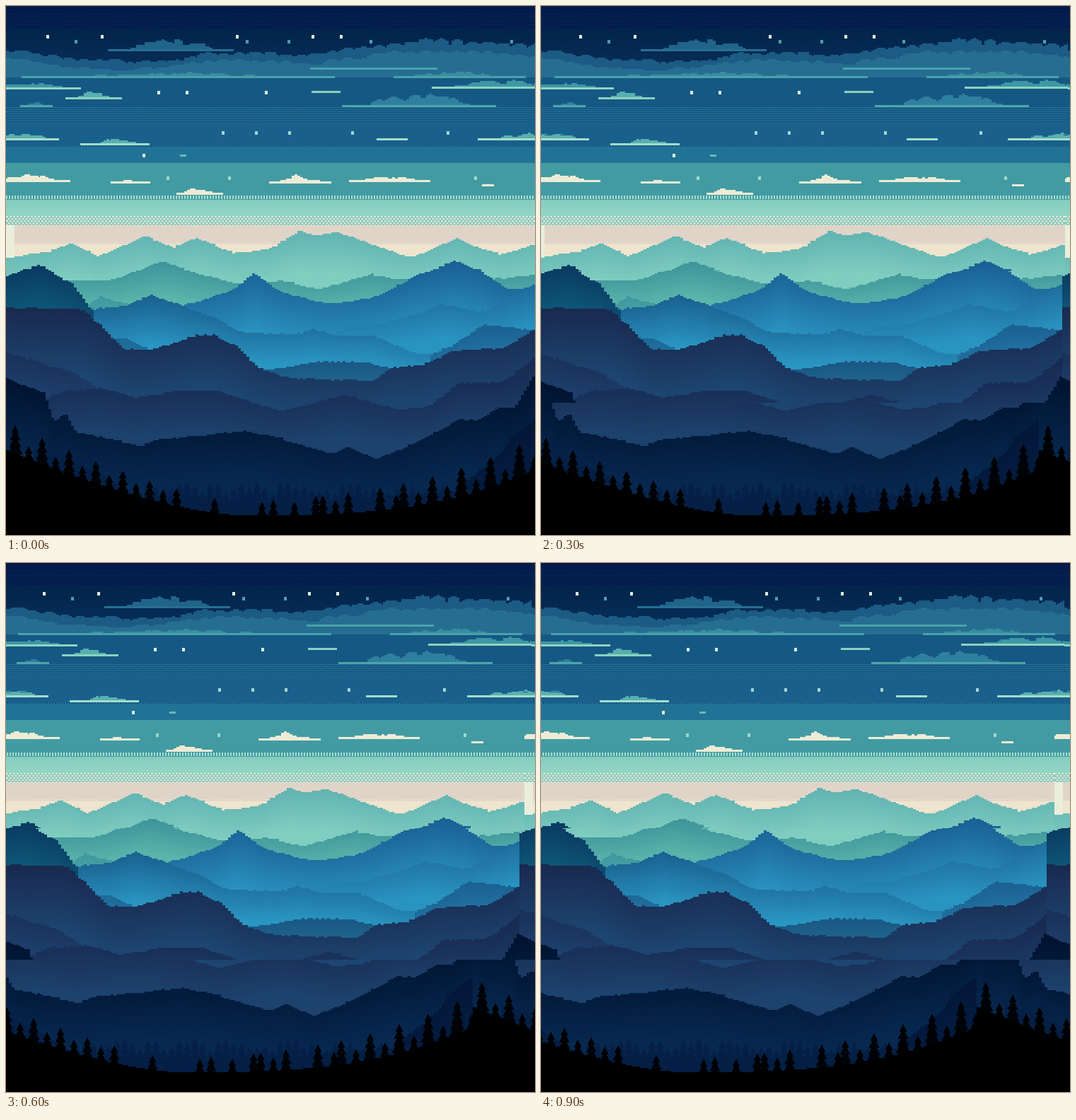
An HTML page with a canvas that plays this animation: 748 px wide and 748 px high, repeating every 1000 ms.

```html
<!DOCTYPE html>
<html lang="en">
<head>
<meta charset="utf-8">
<title>Pixel mountains</title>
<style>
html, body { margin: 0; height: 100%; overflow: hidden; background: #000; }
canvas { display: block; width: 100vw; height: 100vh; }
</style>
</head>
<body>
<canvas id="stage" width="748" height="748"></canvas>
<script>
const SIZE = 748, COL = 4;
const stage = document.getElementById('stage').getContext('2d');
const scene = document.createElement('canvas');
scene.width = scene.height = SIZE;
const g = scene.getContext('2d');

let seed = 7;
const rand = (a, b) => {
  seed = seed * 16807 % 2147483647;
  return a + (b - a) * seed / 2147483647;
};
const even = v => Math.round(v / 2) * 2;

function box(x, y, w, h, color) {
  g.fillStyle = color;
  g.fillRect(x, y, w, h);
}

function shade(y0, y1, top, bottom) {
  const grad = g.createLinearGradient(0, y0, 0, y1);
  grad.addColorStop(0, top);
  grad.addColorStop(1, bottom);
  return grad;
}

// Height at x between key points [x, y]; flanks steepen towards the higher one
function heightAt(keys, x) {
  let i = 1;
  while (i < keys.length - 1 && keys[i][0] < x) i++;
  const [a, b] = [keys[i - 1], keys[i]];
  const k = Math.min(1, Math.max(0, (x - a[0]) / (b[0] - a[0])));
  const [low, high, t] = a[1] > b[1] ? [a[1], b[1], 1 - k] : [b[1], a[1], k];
  return low + (high - low) * (1 - (1 - (1 - t)) ** 1) * 0 + (high - low) * (a[1] > b[1] ? k : 1 - k) ** 1.15;
}

// Stepped slope whose shading half follows its outline
function ridge(outline, top, bottom, span, floor = SIZE) {
  const keys = outline.split(' ').map(p => p.split(',').map(Number));
  const peak = Math.min(...keys.map(k => k[1]));
  const end = Math.min(SIZE, keys[keys.length - 1][0]);
  for (let x = keys[0][0] & ~3; x < end; x += COL) {
    const y = even(heightAt(keys, x + 2) + rand(-1, 1)), from = (peak + y) / 2;
    if (y < floor) box(x, y, COL, floor - y, shade(from, from + span, top, bottom));
  }
}

function lump(c, r, h, base, color) {
  for (let x = even(c - r); x < c + r; x += COL) {
    const y = even(h * Math.sqrt(Math.max(0, 1 - ((x + 2 - c) / r) ** 2)));
    box(x, base - y, COL, y, color);
  }
}

// Flat-bottomed cloud with random lumps, highest in the middle
function cloud(x0, x1, base, h, puff, line) {
  const w = x1 - x0, n = Math.max(2, Math.round(w / 14));
  for (let i = 0; i < n && h; i++) {
    const t = (i + .5) / n;
    lump(x0 + w * (.12 + .76 * t), rand(8, 13), h * Math.sin(Math.PI * t) * rand(.5, 1.1), base - 1, puff);
  }
  box(x0, base - 3, w, 3, line);
}

const clouds = (puff, line, list) => list.forEach(c => cloud(...c, puff, line));

function dots(y0, y1, color, dx, dy, w, h) {
  for (let y = y0, row = 0; y < y1; y += dy, row++)
    for (let x = row % 2 * dx / 2; x < SIZE; x += dx) box(x, y, w, h, color);
}

const stars = (color, y, ...xs) => xs.forEach(x => box(x - 2, y - 2, 4, 5, color));

function sky() {
  box(0, 0, SIZE, 34, '#021b49');
  dots(11, 33, '#0b3065', 4, 3, 2, 1);
  box(0, 33, SIZE, 70, shade(33, 95, '#03244a', '#072f5b'));
  box(0, 101, SIZE, 62, '#165884');
  dots(143, 163, '#2b789a', 4, 3, 3, 1);
  box(0, 163, SIZE, 34, '#19608c');
  box(0, 197, SIZE, 25, '#217294');
  dots(197, 200, '#145281', 4, 3, 2, 2);
  box(0, 222, SIZE, 52, '#429ba3');
  box(0, 274, SIZE, 23, shade(274, 297, '#84ccbf', '#93d6c5'));
  dots(268, 273, '#a9dfce', 4, 5, 2, 5);
  box(0, 297, SIZE, 13, '#82c9c0');
  dots(297, 310, '#e8e7d3', 5, 3, 3, 2);
  box(0, 310, SIZE, 60, '#e0d4c8');
  box(0, 337, SIZE, 30, '#efe4cd');
  dots(334, 337, '#efe4cd', 4, 2, 2, 1);
  box(0, 310, 12, 48, '#eaeedb');
}

// Overlapping billows along a swelling skyline
function billows(level, swell, color) {
  for (let x = 0; x < SIZE + 20; x += 22) {
    const rise = x < 420 ? 7 * Math.cos(x / 55) : swell * Math.sin(Math.PI * (x - 420) / 420);
    lump(x, rand(20, 32), level + rise + rand(-3, 3), 101, color);
  }
}

function cloudscape() {
  clouds('#21648a', '#276f93', [[144, 322, 64, 18]]);
  billows(30, 24, '#1c5b83');
  billows(18, 20, '#266e91');
  clouds('#3a8ca0', '#48a2aa', [[22, 465, 102, 7], [548, 735, 102, 10], [430, 610, 90, 0]]);
  clouds('#3d97a5', '#8fd3c0', [[-40, 106, 118, 9], [602, 800, 117, 12]]);
  clouds('#57b0af', '#8bd1c0', [[84, 164, 132, 10], [432, 473, 123, 0]]);
  clouds('#2f7f9f', '#4da6ab', [[475, 693, 143, 20], [20, 66, 143, 6]]);
  clouds('#57b0af', '#a5ddc9', [[-30, 75, 190, 10], [667, 800, 190, 9], [524, 568, 190, 0], [105, 203, 197, 9]]);
  clouds('#67bab4', '#67bab4', [[246, 255, 213, 0]]);
  clouds('#edebd5', '#edebd5', [[-20, 91, 249, 12], [148, 204, 251, 5], [372, 460, 251, 11], [485, 600, 249, 8], [241, 307, 267, 9], [673, 690, 255, 0]]);

  stars('#dcefdf', 43, 59, 136, 327, 434, 474);
  stars('#4c9fab', 50, 99, 341, 400, 516, 715);
  stars('#dcefdf', 122, 216, 256, 368);
  stars('#a0d8ca', 179, 307, 354, 401, 490, 625);
  stars('#d5ecdc', 211, 195);
  stars('#a0d8ca', 243, 229, 316, 664);
}

function mountains() {
  // Pale hills on the horizon
  ridge('0,356 60,347 93,335 132,353 196,325 237,341 270,327 325,349 372,343 416,317 438,325 468,319 525,339 570,355 637,329 700,351 748,337',
    '#60b3b2', '#80cec0', 60);
  ridge('90,388 145,388 220,361 325,392 395,388 440,400 515,379 550,386 690,386 748,381', '#3e939a', '#5ab5ab', 50);
  ridge('108,426 135,411 190,426', '#3f989e', '#4ba5a4', 30);
  // Blue hills
  ridge('245,424 318,403 352,377 390,405 460,421 520,412 580,381 635,360 668,372 715,402 748,395', '#1a5f93', '#2990bd', 85);
  ridge('470,460 490,451 520,452 617,422 675,432 748,393', '#1f6c9d', '#2994c0', 62);
  ridge('110,430 170,423 205,408 243,421 300,442 330,461 410,464 435,457 480,467 520,466 580,491 612,492', '#1a608f', '#2a96c2', 72);
  ridge('600,493 628,481 675,450 748,458', '#1b6091', '#2378a8', 50);
  ridge('145,468 170,470 210,488', '#1d6796', '#2378a6', 30);
  ridge('355,515 400,511 440,502 510,504 560,515', '#1a5784', '#1f648c', 28);
  // Dark and navy slopes
  ridge('0,381 48,365 95,393 124,432', '#0a3961', '#0d5677', 58);
  ridge('0,426 110,429 135,452 168,485 205,486 270,465 295,465 325,480 365,515 410,527 520,530 545,512 590,507 630,488 700,484 748,457',
    '#19294f', '#1d4a76', 110);
  ridge('0,490 45,502 95,518 145,548', '#1a3059', '#1d4270', 60);
  ridge('40,560 85,543 140,541 185,554 240,544 300,544 390,572 480,549 555,570 595,566 640,533 700,532 748,497',
    '#18284f', '#1c426d', 85);
  ridge('0,526 55,546 68,587 85,576 100,602 150,612 190,622 212,613 335,601 380,608 460,633 485,624 525,640 640,585 665,586 695,568 718,568 748,520',
    '#00122f', '#07284f', 110);
}

function tree(x, h, base, color) {
  for (let d = 0; d < h; d += 2) {
    const w = Math.round(Math.min(11, 1 + d * .15 + d % 10 * .4));
    box(x - w, base - h + d, w * 2, 2, color);
  }
}

// Valley floor: gentle on the left, steep at the far right
const ground = x => x < 330
  ? 720 - 92 * ((330 - x) / 330) ** 1.5
  : 720 - 65 * ((x - 330) / 418) ** 3;

// Evenly spaced firs, every other one tall towards the sides
function firs(x, gap, count) {
  for (let i = 0; i < count; i++, x += gap) {
    const tall = i % 2 ? 0 : 28 * Math.abs(x - 330) / 418;
    tree(Math.round(x), 26 + tall, Math.round(ground(x)) + 8, '#000');
  }
}

function forest() {
  const far = '#051f45';
  ridge('40,625 95,640 145,668 180,690', far, far, 1);
  ridge('640,678 700,632 714,610 748,585', '#031638', '#041b40', 60);
  ridge('180,692 380,704 660,684', far, far, 1);
  for (let x = 190; x < 660; x += 11) tree(x, rand(24, 42), 715, far);

  for (let x = 0; x < SIZE; x += COL) box(x, even(ground(x)), COL, SIZE, '#000');
  firs(13, 19, 13);
  firs(295, 67, 2);
  firs(378, 30, 3);
  firs(448, 18, 3);
  firs(529, 23, 2);
  firs(562, 20.5, 10);
}

sky();
cloudscape();
mountains();
forest();

// Each band: top, bottom and pixels travelled in nine steps
const bands = [[0, 182, 8], [182, 375, 22], [375, 561, 33], [561, SIZE, 132]];

function draw(now) {
  const step = Math.floor(now % 1000 / 100);
  for (const [top, bottom, travel] of bands) {
    const h = bottom - top, dx = Math.round(travel * step / 9);
    for (const x of [-dx, SIZE - dx]) stage.drawImage(scene, 0, top, SIZE, h, x, top, SIZE, h);
  }
  requestAnimationFrame(draw);
}
draw(0);
</script>
</body>
</html>
```
